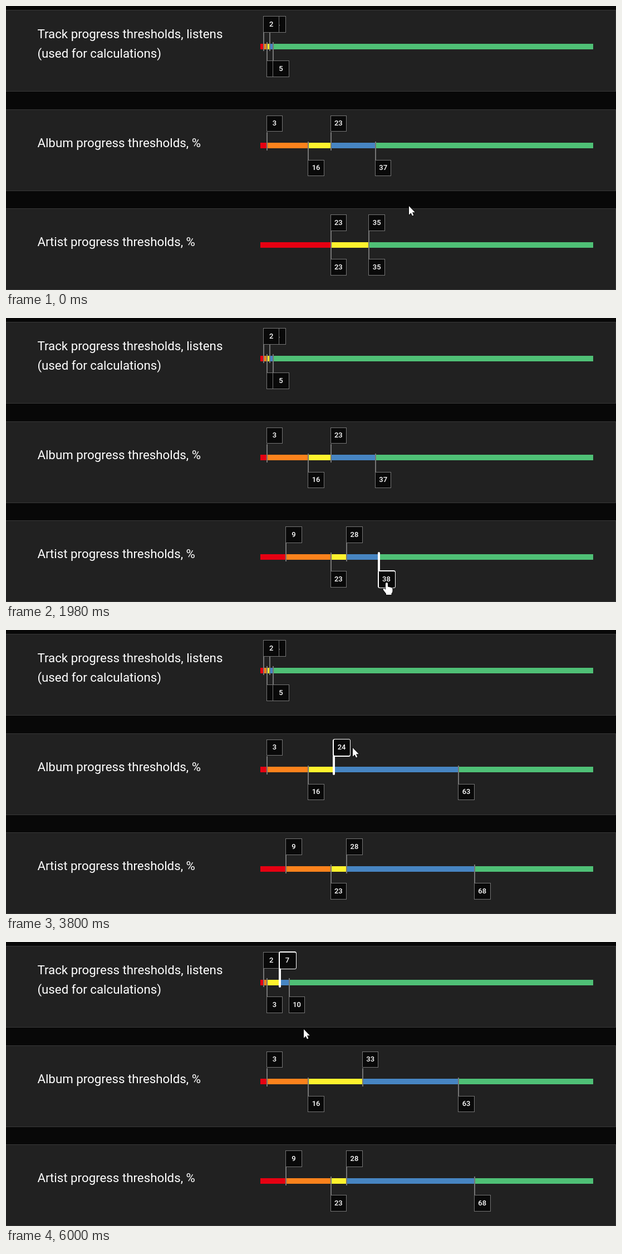
These frames come from a looping animation (1096x511 px, 6530 ms). An HTML page with a canvas:

```html
<!DOCTYPE html>
<html lang="en">
<head>
<meta charset="utf-8">
<title>Progress thresholds</title>
<style>
  html, body { margin: 0; width: 100%; height: 100%; overflow: hidden; background: #080808; }
  canvas { display: block; }
</style>
</head>
<body>
<canvas id="stage" width="1096" height="511"></canvas>
<script>
const ctx = document.getElementById('stage').getContext('2d');
const LOOP = 6530;
const BOX = 29.5;
const BAR_LEFT = 457, BAR_RIGHT = 1055;
const COLORS = ['#e60012', '#fc821c', '#fff22d', '#4785c2', '#4fc076'];

const ROWS = [
  { lines: ['Track progress thresholds, listens', '(used for calculations)'], values: [2, 3, 4, 5] },
  { lines: ['Album progress thresholds, %'], values: [3, 16, 23, 37] },
  { lines: ['Artist progress thresholds, %'], values: [23, 23, 35, 35] },
].map((row, i) => ({ ...row, top: 7 + i * 178.5 }));

// The pointer drags a handle from `start` to `end` and moves on at `leave`.
const DRAGS = [
  { row: 2, handle: 0, to: 9, start: 350, end: 770, leave: 770 },
  { row: 2, handle: 2, to: 28, start: 1410, end: 1530, leave: 1790 },
  { row: 2, handle: 3, to: 68, start: 1960, end: 2210, leave: 2420 },
  { row: 1, handle: 3, to: 63, start: 3080, end: 3260, leave: 3260 },
  { row: 1, handle: 2, to: 33, start: 3780, end: 4000, leave: 4000, grab: { x: 35, y: 15 } },
  { row: 0, handle: 3, to: 10, start: 4370, end: 4700, leave: 4860 },
  { row: 0, handle: 2, to: 7, start: 5030, end: 5380, leave: 5630 },
];
const GRAB = { x: 17, y: 21 };
const ENTRY = { x: 724, y: 360, leave: 20 };
const EXIT = { x: 535, y: 157, arrive: 5980 };

const ARROW = new Path2D('M0 0V15.7L3.6 12.3 6 17.6 8.4 16.6 6 11.3H10.9Z');
const HAND = new Path2D('M-2 2Q-2 0 0 0Q2 0 2 2V7.5L8.5 9Q10.5 9.7 10.5 12V15.5' +
  'Q10.5 18 8.5 19.5V22H-1V20L-6 13.5Q-7 11.2-5 10.7Q-3.5 10.7-2 13Z');

const mix = (a, b, p) => a + (b - a) * p;
const progress = (t, start, end) => Math.min(1, Math.max(0, (t - start) / (end - start)));
const easeOut = p => 1 - (1 - p) ** 2;
const travel = (a, b, p) => ({ x: mix(a.x, b.x, easeOut(p)), y: mix(a.y, b.y, easeOut(p)) });
const valueX = value => 456.16 + (value - 1) * 5.744;
const isBelow = handle => handle % 2 === 1;
const boxTop = (row, handle) => row.top + (isBelow(handle) ? 91 : 11);

function grabPoint({ row, handle, grab = GRAB }, value) {
  return { x: valueX(value) + grab.x, y: boxTop(ROWS[row], handle) + grab.y };
}

function stateAt(t) {
  const values = ROWS.map(row => [...row.values]);
  let focus = null, pointer = ENTRY, leave = ENTRY.leave;
  for (const drag of DRAGS) {
    const from = values[drag.row][drag.handle];
    if (t < drag.start) {
      pointer = travel(pointer, grabPoint(drag, from), progress(t, leave, drag.start - 50));
      return { values, focus, pointer };
    }
    const value = mix(from, drag.to, progress(t, drag.start, drag.end));
    values[drag.row][drag.handle] = Math.round(value);
    pointer = grabPoint(drag, value);
    focus = drag;
    leave = drag.leave;
  }
  return { values, focus, pointer: travel(pointer, EXIT, progress(t, leave, EXIT.arrive)) };
}

// Fills a rectangle whose edges snap to whole pixels.
function rect(x, y, w, h, color) {
  const left = Math.round(x), top = Math.round(y);
  ctx.fillStyle = color;
  ctx.fillRect(left, top, Math.round(x + w) - left, Math.round(y + h) - top);
}

function roundRect(x, y, w, h, radius, color) {
  ctx.fillStyle = color;
  ctx.beginPath();
  ctx.roundRect(Math.round(x), Math.round(y), w, h, radius);
  ctx.fill();
}

function drawHandle(row, handle, value, focused) {
  const x = valueX(value), y = boxTop(row, handle);
  const left = Math.round(x), lineTop = row.top + (isBelow(handle) ? 58 : 41);
  if (focused) {
    roundRect(left - 1, lineTop - 1, 4, 35, 2, '#fff');
    roundRect(left - 1, y - 1, 32, 32, 3.5, '#fff');
    roundRect(left + 0.5, y + 0.5, 29, 29, 2, '#090909');
  } else {
    rect(left, lineTop, 2, 33, '#757575');
    rect(x, y, BOX, BOX, '#757575');
  }
  const inset = Math.round(y) + 1;
  rect(left + 1, inset, Math.round(x + BOX) - left - 2, Math.round(y + BOX) - inset - 1, '#090909');
  ctx.fillStyle = '#fff';
  ctx.font = '500 13px Roboto, sans-serif';
  ctx.textAlign = 'center';
  ctx.fillText(value, x + BOX / 2, Math.round(y + 18.9));
}

function drawRow(row, values, order, focusedHandle) {
  rect(0, row.top, 1096, 147, '#383838');
  rect(0, row.top + 1, 1095, 145, '#212121');

  ctx.fillStyle = '#fff';
  ctx.font = '22.3px Roboto, sans-serif';
  ctx.textAlign = 'left';
  const baseline = Math.round(row.top + (row.lines.length > 1 ? 51 : 68));
  row.lines.forEach((line, i) => ctx.fillText(line, 56.4, baseline + i * 35));

  let left = BAR_LEFT;
  COLORS.forEach((color, i) => {
    const right = i < 4 ? Math.round(valueX(values[i])) + 1 : BAR_RIGHT;
    rect(left, row.top + 60.9, right - left, 10, color);
    left = right;
  });

  for (const handle of order) {
    if (handle !== focusedHandle) drawHandle(row, handle, values[handle], false);
  }
  if (focusedHandle >= 0) drawHandle(row, focusedHandle, values[focusedHandle], true);
}

function drawPointer({ x, y }, values) {
  const overBox = ROWS.some((row, r) => values[r].some((value, handle) => {
    const dx = x - valueX(value), dy = y - boxTop(row, handle);
    return dx >= 0 && dx <= BOX && dy >= 0 && dy <= BOX;
  }));
  const shape = overBox ? HAND : ARROW;
  ctx.save();
  ctx.translate(Math.round(x), Math.round(y));
  ctx.lineWidth = 1.5;
  ctx.lineJoin = 'round';
  ctx.strokeStyle = '#000';
  ctx.stroke(shape);
  ctx.fillStyle = '#fff';
  ctx.fill(shape);
  ctx.restore();
}

function draw(now) {
  const { values, focus, pointer } = stateAt(now % LOOP);
  rect(0, 0, 1096, 511, '#080808');
  ROWS.forEach((row, r) => {
    // The first track handle lies on top until that row is edited.
    const order = r === 0 && focus?.row !== 0 ? [1, 2, 3, 0] : [0, 1, 2, 3];
    drawRow(row, values[r], order, focus?.row === r ? focus.handle : -1);
  });
  drawPointer(pointer, values);
}

let startTime;
function tick(now) {
  startTime ??= now;
  draw(now - startTime);
  requestAnimationFrame(tick);
}
draw(0);
requestAnimationFrame(tick);
</script>
</body>
</html>
```
